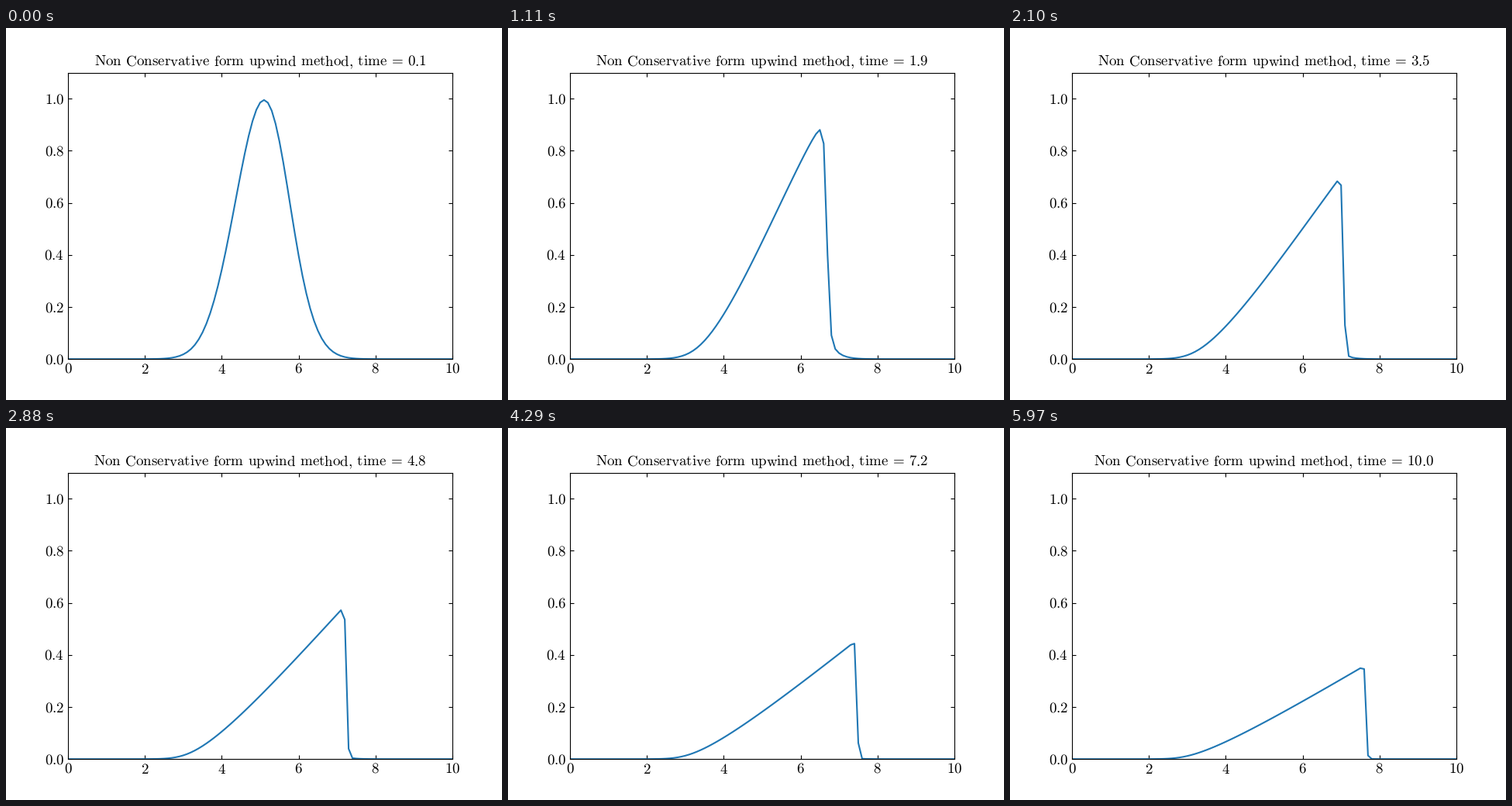
A matplotlib script that plays this animation: 640x480 px, repeating every 6 s.

```python
import numpy as np
import matplotlib.pyplot as plt
from matplotlib.animation import FuncAnimation
from matplotlib.ticker import StrMethodFormatter

FRAMES, DT, DX = 200, 0.05, 0.1
SIZE = 13.65
SPACE = r"\hspace{0.38}"
EQUALS = r"\hspace{0.18}=\hspace{0.18}"

plt.rcParams.update({"mathtext.fontset": "cm", "text.hinting": "none"})


def step(u):
    """One upwind step of u_t + u u_x = 0 in non-conservative form."""
    new = u.copy()
    new[1:] -= DT / DX * u[1:] * (u[1:] - u[:-1])
    return new


def solve():
    u = step(np.exp(-(x - 5) ** 2))
    t, states = 0.0, []
    for _ in range(FRAMES):
        u = step(u)
        t += DT
        states.append((t, u))
    return states


def heading(t):
    words = "Non Conservative form upwind method{,} time".replace(" ", SPACE)
    return rf"$\mathrm{{{words}{EQUALS}{t:.1f}}}$"


x = np.linspace(0, 10, 101)
states = solve()

fig = plt.figure(figsize=(6.4, 4.8), dpi=100, facecolor="white")
ax = fig.add_axes([0.125, 0.11, 0.775, 0.77])
ax.set(xlim=(0, 10), ylim=(0, 1.1),
       xticks=np.arange(0, 11, 2), yticks=np.arange(6) / 5)
ax.tick_params(direction="in", top=True, right=True, labelsize=SIZE)
ax.tick_params(axis="x", pad=3)
ax.xaxis.set_major_formatter(StrMethodFormatter("${x:.0f}$"))
ax.yaxis.set_major_formatter(StrMethodFormatter("${x:.1f}$"))
title = ax.set_title(heading(states[0][0]), fontsize=SIZE)
line, = ax.plot(x, states[0][1], color="#1f77b4", lw=1.5)


def update(i):
    t, u = states[i]
    line.set_ydata(u)
    title.set_text(heading(t))
    return line, title


anim = FuncAnimation(fig, update, frames=FRAMES, interval=30,
                     repeat=True, repeat_delay=0, blit=False)
plt.show()
```
